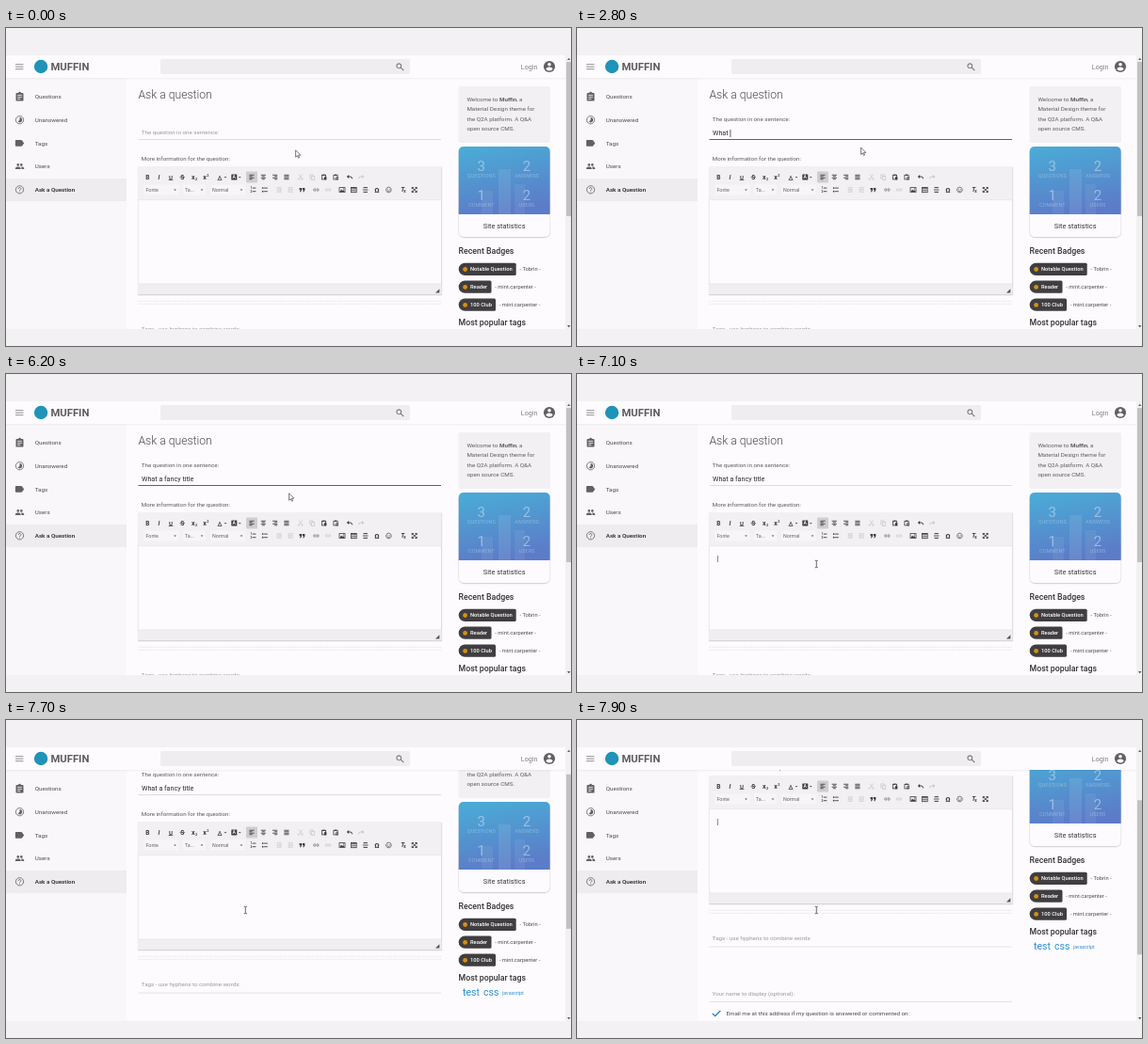
An HTML page that plays this animation: 600x338 px, repeating every 8 s.

```html
<!DOCTYPE html>
<html lang="en">
<head>
<meta charset="utf-8">
<title>Ask a question</title>
<style>
  html, body { margin: 0; width: 100%; height: 100%; overflow: hidden; background: #f3f1f3; }
  svg { display: block; width: 600px; height: 338px; }
  text { font-family: Roboto, Arial, sans-serif; white-space: pre; }
</style>
</head>
<body>
<svg id="stage" viewBox="0 0 600 338"></svg>
<script>
const LOOP = 8000, STEP = 100;
const TITLE = 'What a fancy title';
const INK = '#626063', FAINT = '#c9c8c9', DARK = '#3f3d40', PAPER = '#fdfbfd';

// ---- drawing helpers; text is placed by the middle of its capitals ----
const text = (x, y, str, size, fill = INK, more = '') =>
  `<text x="${x}" y="${y + size * 0.36}" font-size="${size}" fill="${fill}" ${more}>${str}</text>`;
const rect = (x, y, w, h, fill, more = '') =>
  `<rect x="${x}" y="${y}" width="${w}" height="${h}" fill="${fill}" ${more}/>`;
const dot = (x, y, r, fill) => `<circle cx="${x}" cy="${y}" r="${r}" fill="${fill}"/>`;
const line = (d, stroke = INK, w = 1, more = '') =>
  `<path d="${d}" fill="none" stroke="${stroke}" stroke-width="${w}" ${more}/>`;
const shape = (d, fill = INK) => `<path d="${d}" fill="${fill}" fill-rule="evenodd"/>`;
const at = (x, y, body) => `<g transform="translate(${x} ${y})">${body}</g>`;
const LIGHT = 'font-weight="300"', MEDIUM = 'font-weight="500"', BOLD = 'font-weight="700"', CENTER = 'text-anchor="middle"';

// ---- sidebar ----
const sideIcons = [
  rect(-4, -4, 8, 8.6, INK, 'rx=".9"') + dot(0, -4, 1.3, INK) +
    line('M-2.4 -1.6H2.4M-2.4 .4H2.4M-2.4 2.4H.8', '#fff', .8),
  line('M0 -4.1A4.1 4.1 0 1 1 -.01 -4.1Z', INK, .9) + shape('M0 -2.7A2.7 2.7 0 1 1 -1.9 1.9L0 0Z'),
  shape('M-4.6 -2.5Q-4.6 -3.3 -3.8 -3.3H1.6Q2.2 -3.3 2.6 -2.8L4.7 0L2.6 2.8Q2.2 3.3 1.6 3.3H-3.8Q-4.6 3.3 -4.6 2.5Z'),
  dot(-1.7, -1.7, 1.3, INK) + dot(1.8, -1.7, 1.3, INK) +
    shape('M-4.6 3V1.8Q-4.2 .4 -1.7 .4T1.2 1.8V3ZM2 3V1.8Q1.9 1 1.3 .5Q4.4 .3 4.7 1.8V3Z'),
  line('M0 -4.1A4.1 4.1 0 1 1 -.01 -4.1Z', INK, .85) + line('M-1.3 -.9A1.3 1.3 0 1 1 .6 .2Q0 .6 0 1.3M0 1.9V2.7', INK, .8),
];
const sidebar = rect(0, 53, 128, 267, '#f9f7f9') + rect(0, 160, 128, 24, '#eeecee') +
  ['Questions', 'Unanswered', 'Tags', 'Users', 'Ask a Question'].map((name, i) => {
    const y = 73 + i * 24.7;
    return at(14.5, y, sideIcons[i]) + text(30.7, y, name, 6.25, i == 4 ? '#3c3a3c' : '#4c4a4c', i == 4 ? BOLD : '');
  }).join('');

// ---- header ----
const header = rect(0, 53, 594, 1.5, '#0000000a') + rect(0, 29, 594, 24, PAPER) +
  line('M10 38.7H18.4M10 41.2H18.4M10 43.7H18.4', '#777', .8) +
  dot(37.1, 41, 7.2, '#1f93b8') +
  text(47.4, 41.1, 'MUFFIN', 11.3, '#5d5b5d', BOLD) +
  rect(164, 33, 265, 16, '#efedef', 'rx="2"') +
  at(417.6, 40.3, line('M2.1 0A2.4 2.4 0 1 1 2.1 -.01M1.4 1.6L4.7 4.9', '#777', 1.1)) +
  text(546.8, 41, 'Login', 7.15, '#828082') +
  dot(577, 41, 6.1, INK) + dot(577, 38.7, 1.8, '#fff') + shape('M573.3 43.4Q574 41.6 577 41.6T580.7 43.4Q579.5 45.4 577 45.4T573.3 43.4Z', '#fff');

// ---- editor toolbar ----
const caretDown = (x, y) => shape(`M${x - 1.4} ${y - .6}h2.8l-1.4 1.5z`, '#555');
const rows = (widths, align) => line(widths.map((w, i) => {
  const x = align == 'l' ? -2.6 : align == 'r' ? 2.6 - w : -w / 2;
  return `M${x} ${i * 1.5 - 2.25}h${w}`;
}).join(''), DARK, .85);
const clipboard = ink => rect(-2.3, -2.2, 4.2, 4.6, 'none', `stroke="${ink}" stroke-width=".8"`) +
  rect(-1.3, -2.9, 2.2, 1.3, ink) + rect(.1, -.3, 2.6, 3.1, ink);
const arrow = ink => line('M-1.8 -.5H.6Q2.6 -.4 2.6 1.8', ink, 1) + shape('M-3.2 -.5L-.9 -2.4V1.4Z', ink);
const flip = body => `<g transform="scale(-1 1)">${body}</g>`;
const list = mark => line('M-.9 -1.9H2.8M-.9 1.7H2.8', DARK, .9) + mark;
const indent = line('M-2.6 -2.2H2.6M0 -.7H2.6M0 .8H2.6M-2.6 2.2H2.6', FAINT, .8) + shape('M-2.6 0L-.8 -1.3V1.3Z', FAINT);
const chain = ink => line('M-.6 -1.1H-1.7Q-2.8 -1.1 -2.8 0T-1.7 1.1H-.6M.6 -1.1H1.7Q2.8 -1.1 2.8 0T1.7 1.1H.6M-1.3 0H1.3', ink, .8);
const glyph = (str, more = '', size = 6.6) => text(0, 0, str, size, DARK, CENTER + ' ' + more);
const indexed = y => text(-.7, 0, 'x', 7, DARK, CENTER + ' ' + BOLD) + text(1.4, y, '2', 3.8, DARK, BOLD);

const topRow = [
  [150.3, glyph('B', BOLD)],
  [162.5, glyph('I', 'font-style="italic" font-weight="700"')],
  [175, glyph('U', BOLD, 6) + line('M-2.3 3H2.3', DARK, .8)],
  [187.3, glyph('S', BOLD) + line('M-2.8 0H2.8', DARK, .6)],
  [199.5, indexed(2)],
  [211.8, indexed(-1.8)],
  [227, glyph('A', MEDIUM, 6) + line('M-2.3 3H2.3', DARK, .8) + caretDown(6, 0)],
  [242.3, rect(-3, -3, 6, 6, DARK, 'rx=".5"') + text(0, 0, 'A', 5, '#fff', CENTER + ' ' + BOLD) + caretDown(6, 0)],
  [261, rect(-6, -6, 12, 12, '#cfcecf', 'rx="1"') + rows([5.2, 3.2, 5.2, 3.2], 'l')],
  [273.3, rows([5.2, 3, 5.2, 3])],
  [285.6, rows([5.2, 3.2, 5.2, 3.2], 'r')],
  [297.9, rows([5.2, 5.2, 5.2, 5.2])],
  [312.8, line('M-1.8 -3L1.2 1.4M1.8 -3L-1.2 1.4M-1.1 2.1A.8 .8 0 1 1 -1.1 2M2.5 2.1A.8 .8 0 1 1 2.5 2', FAINT, .7)],
  [325.2, rect(-2.4, -2.6, 3.2, 4, 'none', `stroke="${FAINT}" stroke-width=".7"`) + rect(-.7, -1, 3.2, 4, '#eee', `stroke="${FAINT}" stroke-width=".7"`)],
  [337.7, clipboard(DARK)],
  [350.2, clipboard(DARK) + line('M.7 .6H2.2M1.45 .6V2.2', '#fff', .5)],
  [365, arrow(DARK)],
  [377.2, flip(arrow(FAINT))],
];
const lowRow = [
  [262.6, list(text(-3.2, -1.9, '1', 3.2, DARK, BOLD) + text(-3.2, 1.8, '2', 3.2, DARK, BOLD))],
  [275, list(dot(-2.3, -1.9, .9, DARK) + dot(-2.3, 1.7, .9, DARK))],
  [290, indent], [302.2, flip(indent)],
  [314.5, shape('M-2.9 -2.1H-.4V.3L-1.5 2.2H-2.6L-1.7 .3H-2.9ZM.4 -2.1H2.9V.3L1.8 2.2H.7L1.6 .3H.4Z', DARK)],
  [329.4, chain('#777')],
  [342, chain(FAINT)],
  [357, rect(-3, -2.4, 6, 4.9, 'none', `stroke="${DARK}" stroke-width=".8"`) + shape('M-2.5 2L-.8 -.4L.3 .9L1.3 -.1L2.5 2Z', DARK) + dot(1.3, -1.1, .6, DARK)],
  [369.3, rect(-2.9, -2.6, 5.8, 5.3, 'none', `stroke="${DARK}" stroke-width=".8"`) + line('M-2.9 -2H2.9', DARK, 1.2) + line('M-2.9 .5H2.9M-1 -2V2.6M1 -2V2.6', DARK, .5)],
  [381.7, line('M-2.2 -2.5H2.2M-2.2 2.5H2.2', DARK, .9) + line('M-2.8 0H2.8', DARK, .9) + line('M-2.2 -1.3H2.2M-2.2 1.3H2.2', '#aaa', .5)],
  [394, glyph('Ω', BOLD, 8)],
  [406.4, line('M2.8 0A2.8 2.8 0 1 1 2.8 -.01M-1.4 .8Q0 2.2 1.4 .8', DARK, .7) + dot(-1, -.8, .45, DARK) + dot(1, -.8, .45, DARK)],
  [421.2, glyph('T', 'font-style="italic" font-weight="700"') + text(1.1, 1.8, 'x', 4.6, DARK, BOLD)],
  [433.7, line('M-2.5 -.8V-2.5H-.8M.8 -2.5H2.5V-.8M2.5 .8V2.5H.8M-.8 2.5H-2.5V.8M-2.3 -2.3L2.3 2.3M2.3 -2.3L-2.3 2.3', DARK, 1)],
];
const combo = (x, w, label) => rect(x, 166.5, w, 11, '#f7f5f7', 'rx="1"') +
  text(x + 2, 172, label, 5.3, '#666') + caretDown(x + w - 4, 172);
const rowAt = (items, y) => items.map(([x, body]) => at(x, y, body)).join('');

const editor =
  rect(139.6, 147.6, 323.8, 137.2, '#0000000c', 'rx="1.5"') +
  rect(140, 147.5, 323, 136.3, '#00000026', 'rx="1"') +
  rect(140.3, 147, 322, 136, PAPER) +
  rect(140.3, 147, 322, 36, '#f2f0f2') + rect(140.3, 182.6, 322, .5, '#e3e1e3') +
  rowAt(topRow, 158.5) +
  combo(146.5, 37, 'Fonte') + combo(188, 24, 'Ta...') + combo(217, 37, 'Normal') +
  rowAt(lowRow, 172) +
  rect(140.3, 272, 322, 11, '#f0eef0') + rect(140.3, 271.7, 322, .5, '#dfdddf') +
  shape('M460.3 277.3V281.6H456Z', '#555') +
  line('M140.5 290.3H462.5M140.5 293.3H462.5', '#d8d6d8', .6, 'stroke-dasharray="1.6 1"');

// ---- right column ----
const pill = (y, w, badge, who) =>
  shape(`M487.3 ${y - 6.6}H${479.5 + w}q1.5 0 1.5 1.5v10.2q0 1.5 -1.5 1.5H487.3a6.6 6.6 0 0 1 0 -13.2Z`, '#403e40') +
  dot(487.6, y + .2, 2.4, '#d68f14') +
  text(493, y, badge, 5.75, '#fff', MEDIUM) + text(481 + w + 3.8, y, `- ${who} -`, 5.75, '#4c4a4c');
const stat = (x, y, n, label) =>
  text(x, y, n, 15, '#ffffff68', CENTER) + text(x, y + 10.3, label, 5.6, '#ffffff50', CENTER);
const welcome = ['Welcome to <tspan font-weight="700">Muffin</tspan>, a', 'Material Design theme for', 'the Q2A platform. A Q&amp;A', 'open source CMS.'];
const aside =
  rect(480.5, 62, 97.5, 60, '#f2f0f2', 'rx="2"') +
  welcome.map((s, i) => text(489.4, 75.3 + i * 10.6, s, 6.25, '#5e5c5e')).join('') +
  rect(480.2, 126.8, 98, 96.6, '#00000010', 'rx="6"') + rect(480.5, 126.5, 97.5, 96.2, '#00000022', 'rx="6"') +
  rect(480.7, 126, 97, 96, PAPER, 'rx="5.5"') +
  shape('M480.7 198V131.5q0 -5.5 5.5 -5.5H572.2q5.5 0 5.5 5.5V198Z', 'url(#sky)') +
  rect(505, 173, 12, 25, '#ffffff10') + rect(523, 150, 13, 48, '#ffffff16') + rect(540, 166, 11, 32, '#ffffff10') +
  stat(504.8, 147, 3, 'QUESTIONS') + stat(553, 147, 2, 'ANSWERS') +
  stat(504.8, 177.6, 1, 'COMMENT') + stat(553, 177.6, 2, 'USERS') +
  text(529.2, 210.2, 'Site statistics', 7.45, '#3a383a', CENTER) +
  text(480.6, 236.6, 'Recent Badges', 8.75, '#333', MEDIUM) +
  pill(256.3, 60.7, 'Notable Question', 'Tobrin') +
  pill(275.2, 34.5, 'Reader', 'mint.carpenter') +
  pill(294.2, 39, '100 Club', 'mint.carpenter') +
  text(480.6, 312.8, 'Most popular tags', 8.75, '#333', MEDIUM) +
  text(485, 328, 'test', 10.5, '#2a8fd0') + text(507, 328, 'css', 10.5, '#2a8fd0') + text(527, 329.3, 'javascript', 5.3, '#2a8fd0');

// ---- form ----
const field = (y, label) => text(143.8, y, label, 6.2, '#9a989a') + rect(140.5, y + 8.7, 321.5, .7, '#dad8da');
const form =
  text(140.4, 70.8, 'Ask a question', 12.2, '#4a484a', LIGHT) +
  rect(140.5, 118, 321.5, 1, '#dedcde') +
  rect(140.5, 118, 321.5, 1, INK, 'id="focus"') +
  text(143.8, 0, 'The question in one sentence:', 6.2, '#9a989a', 'id="label"') +
  text(144, 111.7, TITLE, 7.2, 'none', 'id="ruler"') +
  text(144, 111.7, '', 7.2, '#2a282a', 'id="typed"') +
  rect(0, 108, .7, 8, '#222', 'id="caret"') +
  text(143.8, 138.4, 'More information for the question:', 6.2, '#5a585a') +
  editor + rect(149.2, 193, .6, 7, '#444', 'id="bodyCaret"') +
  field(320, 'Tags - use hyphens to combine words:') +
  field(378.5, 'Your name to display (optional):') +
  line('M143.8 399.8L146.6 402.6L152.4 396.8', '#1c75bb', 1.2) +
  text(158.5, 400.1, 'Email me at this address if my question is answered or commented on:', 6.2, '#4a484a');

const scrollbar = rect(594, 29, 6, 291, '#f2f0f2') + rect(595, 36, 5, 164, '#c2c0c2', 'id="thumb"') +
  shape('M596 34L597.7 31.8L599.4 34Z', '#666') + shape('M596 316L597.7 318.2L599.4 316Z', '#555');

const pointer =
  `<g id="arrow"><path d="M0 0V7.4L1.7 5.8L2.8 8.4L4 7.9L2.9 5.4H5.2Z" fill="#fff" stroke="#444" stroke-width=".7"/></g>` +
  `<g id="beam">${line('M-1.6 -3.8Q0 -3.8 0 -3.1V3.1Q0 3.8 -1.6 3.8M1.6 -3.8Q0 -3.8 0 -3.1M0 3.1Q0 3.8 1.6 3.8', '#444', .8)}</g>`;

document.getElementById('stage').innerHTML =
  `<defs><linearGradient id="sky" x1=".2" y1="0" x2=".45" y2="1"><stop offset="0" stop-color="#4aabd6"/><stop offset="1" stop-color="#5c7bc8"/></linearGradient>
  <clipPath id="view"><rect y="29" width="600" height="291"/></clipPath></defs>` +
  rect(0, 0, 600, 338, '#f3f1f3') +
  `<g clip-path="url(#view)">${rect(0, 29, 600, 291, PAPER)}<g id="page">${form}${aside}</g>${sidebar}${header}${scrollbar}</g>${pointer}`;

// ---- motion ----
const el = Object.fromEntries([...document.querySelectorAll('[id]')].map(n => [n.id, n]));
const typing = [[2000, 1], [2200, 2], [2500, 3], [2600, 4], [2800, 5], [3100, 6], [3500, 8], [3700, 9],
  [4200, 10], [4300, 11], [4800, 13], [5000, 14], [5100, 15], [5200, 16], [5300, 17], [5400, 18]];
const mouse = [[0, 307.6, 129.8], [100, 307, 128], [400, 303, 113], [700, 302, 113], [900, 301.6, 127],
  [6100, 301.6, 127], [6200, 300.6, 126.8], [6600, 254.3, 202]];
const scrolling = [[7400, 0], [7500, 1], [7600, 17], [7700, 39], [7800, 65], [7900, 88]];

// Linear interpolation of one column in a table of [time, ...values].
function track(keys, t, col = 1) {
  const i = keys.findIndex(k => k[0] > t);
  if (i < 0) return keys[keys.length - 1][col];
  if (i == 0) return keys[0][col];
  const a = keys[i - 1], b = keys[i];
  return a[col] + (b[col] - a[col]) * (t - a[0]) / (b[0] - a[0]);
}
const show = (node, on) => node.setAttribute('visibility', on ? 'visible' : 'hidden');
const blink = (t, start) => (t - start) % 1000 < 500;

function draw(t) {
  const scroll = track(scrolling, t);
  el.page.setAttribute('transform', `translate(0 ${-scroll})`);
  el.thumb.setAttribute('y', 36 + scroll * .56);

  const float = track([[600, 0], [900, 1]], t);
  el.label.setAttribute('y', 112.6 - 13.7 * float);
  el.label.setAttribute('fill', float > .3 ? '#5a585a' : '#9a989a');
  const w = 321.5 * track([[600, 0], [900, 1], [6600, 1], [6800, 0]], t);
  el.focus.setAttribute('width', w);
  el.focus.setAttribute('x', 301.25 - w / 2);

  const last = typing.filter(k => k[0] <= t).pop() || [700, 0];
  const n = last[1];
  el.typed.textContent = TITLE.slice(0, n);
  el.caret.setAttribute('x', 144.2 + (n ? el.ruler.getSubStringLength(0, n) : 0));
  const idle = t >= 1200 && t < 1800;
  show(el.caret, t >= 700 && t < 6600 && !idle && (n == 0 || blink(t, last[0])));
  show(el.bodyCaret, t >= 6800 && blink(t, 6800));

  const x = track(mouse, t), y = track(mouse, t, 2);
  const overText = y > 183 || (y > 104 && y < 119);
  show(el.arrow, !overText);
  show(el.beam, overText);
  for (const node of [el.arrow, el.beam]) node.setAttribute('transform', `translate(${x} ${y})`);
}

const begin = performance.now();
function frame() {
  const t = (performance.now() - begin) % LOOP;
  draw(Math.floor(t / STEP) * STEP);
  requestAnimationFrame(frame);
}
frame();
</script>
</body>
</html>
```
